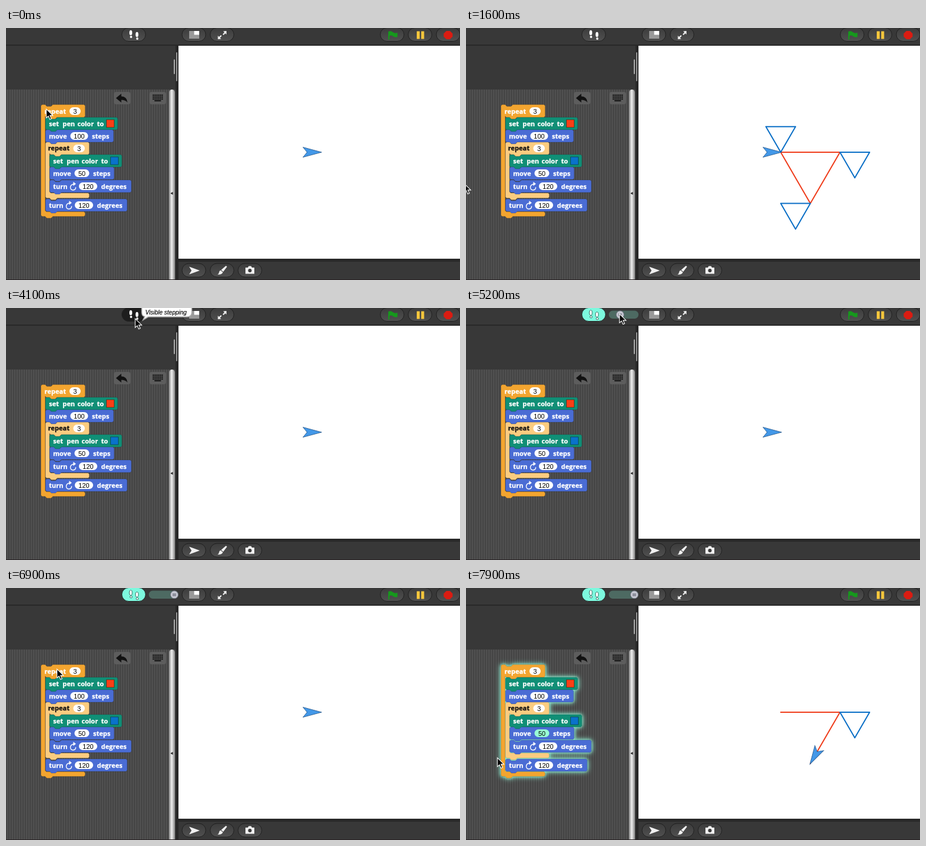
Animation of 766 by 426 pixels, one loop 8 s. Source, as an HTML page:

```html
<!DOCTYPE html>
<html lang="en">
<head>
<meta charset="utf-8">
<title>Visible stepping</title>
<style>
  html, body { margin: 0; width: 100%; height: 100%; overflow: hidden; background: #383838; }
  svg { display: block; width: 766px; height: 426px; }
  .word { font: bold 11px "Open Sans", "Noto Sans", sans-serif; fill: #fff; stroke: #fff; stroke-width: .3; }
  .dark { fill: #111; stroke: #111; }
  .num { font: 11px "Liberation Sans", Arial, sans-serif; text-anchor: middle; fill: #000; }
  .tip { font: italic 10px "Liberation Sans", Arial, sans-serif; fill: #000; stroke: #000; stroke-width: .15; }
  .block { stroke: #0004; stroke-width: .6; }
  .trail { fill: none; stroke-width: 2; stroke-linecap: round; }
  .glow { filter: drop-shadow(0 0 2px #8fecd0) drop-shadow(0 0 4px #8fecd0); }
  .lit { fill: #99ffd5; }
</style>
</head>
<body>
<svg id="stage" viewBox="0 0 766 426" xmlns="http://www.w3.org/2000/svg"></svg>
<script>
const ORANGE = '#f3a530', PALE = '#fbcc80', GREEN = '#108f76', BLUE = '#4a6cd4';
const PENS = { red: '#ef3d1c', blue: '#0b6fc6' };
const rect = (x, y, w, h, fill, rx = 0, more = '') =>
  `<rect x="${x}" y="${y}" width="${w}" height="${h}" rx="${rx}" fill="${fill}" ${more}/>`;
const shape = (d, fill, more = '') => `<path d="${d}" fill="${fill}" ${more}/>`;
const pill = (cx, cy, id = '') =>
  rect(cx - 20, cy - 12, 40, 23, 'url(#button)', 11.5, `stroke="#202020" ${id && `id="${id}"`}`);

// Block outlines: a dent on top, a matching tab underneath
const dent = (x, y, w) => `M${x} ${y + 2}l2-2h5l3 3h7l3-3H${x + w - 2}l2 2`;
const tab = x => `H${x + 20}l-3 3h-7l-3-3H${x + 2}l-2-2`;
const block = (id, d, color) => shape(d + 'z', color, `class="block" id="${id}"`);
const command = (id, x, y, w, h, color) =>
  block(id, `${dent(x, y, w)}V${y + h - 2}l-2 2${tab(x)}`, color);
const loop = (id, x, y, w, head, foot, end, color) =>
  block(id, `${dent(x, y, w)}V${y + head - 2}l-2 2${tab(x + 7)}V${foot - 2}l2 2H${x + w - 2}l2 2V${end - 2}l-2 2${tab(x)}`, color);

const word = (x, y, s, cls = '') => `<text class="word ${cls}" x="${x}" y="${y}">${s}</text>`;
const slot = (id, x, y, w, n) =>
  rect(x, y - 6.5, w, 13, '#fff', 6.5, `id="${id}Slot"`) +
  `<text class="num" x="${x + w / 2}" y="${y + 4}">${n}</text>`;

const pen = (id, x, y, color) => command(id, x, y, 122, 21, GREEN) +
  ['set', 'pen', 'color', 'to'].map((s, i) => word(x + [6, 29, 54, 87][i], y + 14.5, s)).join('') +
  rect(x + 103, y + 4, 13, 13, color, 0, `stroke="#0006" id="${id}Slot"`);
const move = (id, x, y, w, n, slotW) => command(id, x, y, w, 21, BLUE) +
  word(x + 6, y + 14.5, 'move') + slot(id, x + 42, y + 10.5, slotW, n) +
  word(x + 48.5 + slotW, y + 14.5, 'steps');
const turn = (id, x, y) => command(id, x, y, 138, 21, BLUE) + word(x + 6, y + 14.5, 'turn') +
  `<g transform="translate(${x + 39.5} ${y + 11})">` +
  shape('M1-4C-6-3-6 6 0 6 4 6 5 3 4.500 1', 'none', 'stroke="#fff" stroke-width="1.4"') +
  shape('M.5-8L5-4.500.5-1z', '#fff') + '</g>' +
  slot(id, x + 49.5, y + 10.5, 31, 120) + word(x + 87, y + 14.5, 'degrees');

const script = loop('outer', 59, 129.5, 74.5, 21.5, 310.5, 318.5, ORANGE) +
  word(65, 144.5, 'repeat') + slot('outer', 107, 140.5, 19, 3) +
  pen('penA', 66.5, 151, '#f93f16') + move('moveA', 66.5, 172, 115, 100, 30) +
  loop('inner', 66.5, 193, 74, 21, 279, 287.5, PALE) +
  word(71, 206.5, 'repeat', 'dark') + slot('inner', 113.5, 203.5, 19.5, 3) +
  pen('penB', 73.5, 214, '#0a72cb') + move('moveB', 73.5, 235, 109, 50, 25) +
  turn('turnB', 73.5, 257) + turn('turnA', 66.5, 289);

const foot = (x, y) => `<ellipse cx="${x}" cy="${y}" rx="2.4" ry="4.3"/><circle cx="${x + .5}" cy="${y + 7}" r="1.9"/>`;
const white = d => shape(d, '#f2f2f2');

const toolbar = pill(215.5, 11.5, 'feet') +
  `<g id="prints" fill="#fff">${foot(210.5, 8)}${foot(221, 11)}</g>` +
  pill(317, 11.5) + rect(309, 5, 17, 13, '#999') + rect(317.5, 5, 8.5, 6.5, '#fff') +
  pill(364.5, 11.5) + white('M372 5v6l-2-2-3 3-1.5-1.5 3-3-2-2zM357.500 19v-6l2 2 3-3 1.500 1.500-3 3 2 2z') +
  pill(651.5, 11.5) + shape('M645 6q4-2 7.500 1t8 1v7q-4 1.500-7.500-1t-6-.5v6h-2z', '#16981c') +
  pill(698.5, 11.5) + rect(693, 5.5, 5, 13, '#f5c63c') + rect(700.5, 5.5, 5, 13, '#f5c63c') +
  pill(746, 11.5) + shape('M743 5h6l4.500 4.500v5l-4.500 4.500h-6l-4.500-4.500v-5z', '#d91c12');

const corral = pill(317, 410) + white('M309 403.500L327 410l-18 6.500 4-6.500z') +
  pill(364.5, 410) + white('M371 402l2 1.500-6.500 8.500-3.500-3zM362 409.500l4 3.500q-2 4.500-9 3.500 2.500-1 2.500-3.500t2.500-3.500z') +
  pill(411.5, 410) + white('M404 405h4l1.500-2.500h4l1.500 2.500h4v10.500h-15z') +
  '<circle cx="411.500" cy="410" r="3" fill="#3c3c3c"/>';

const keys = [0, 1, 2].map(r => [0, 1, 2, 3, 4, 5].map(c =>
  rect(247.5 + c * 3, 112.5 + r * 3.2, 2.2, 2.2, '#111')).join('')).join('');

stage.innerHTML = `
<defs>
  <linearGradient id="button" x2="0" y2="1"><stop stop-color="#3c3c3c"/><stop offset="1" stop-color="#505050"/></linearGradient>
  <linearGradient id="bar"><stop stop-color="#888"/><stop offset=".45" stop-color="#eee"/><stop offset="1" stop-color="#888"/></linearGradient>
  <pattern id="stripes" width="4" height="4" patternUnits="userSpaceOnUse">
    ${rect(0, 0, 4, 4, '#505050')}${rect(0, 0, 1.5, 4, '#414141')}</pattern>
  <clipPath id="canvas">${rect(291, 30, 475, 360, '#fff')}</clipPath>
</defs>
${rect(0, 0, 766, 426, '#383838')}
${rect(0, 28, 766, 2, '#282828')}${rect(286, 30, 5, 396, '#282828')}
${rect(0, 104, 286, 322, 'url(#stripes)')}
${rect(275, 104, 10, 330, 'url(#bar)', 5)}
${shape('M277.500 279.500l4-2.500v5z', '#222')}
${rect(283, 53, 2, 25, '#aaa', 1)}${rect(287, 41, 2, 49, '#999', 1)}
${rect(182, 108, 28, 21, '#5d5d5d', 4)}
${shape('M185.500 118.500l9-7.500v4.500q9.500 0 10.500 10.500-3.500-4.500-10.500-4.500v4.500z', '#111')}
${rect(242, 108, 28, 21, '#5d5d5d', 4)}${keys}${rect(250.5, 122, 11, 2, '#111')}
${rect(291, 30, 475, 360, '#fff')}${rect(291, 390, 475, 5, '#282828')}
${rect(0, 425, 766, 1, '#262022')}<ellipse cx="377" cy="428" rx="20" ry="4" fill="#222"/>
${toolbar}${corral}
<g id="slider">${rect(241, 4.5, 50, 13.5, '#4d6a62', 6.5)}
  <g id="thumb"><circle r="6.500" fill="#c3c6d0" stroke="#667" stroke-width=".8"/>
  <path d="M-3-1h6M-3 1.500h6" stroke="#445" /></g></g>
<g id="script">${script}</g>
<g clip-path="url(#canvas)">
  <path id="red" class="trail" stroke="${PENS.red}"/><path id="blue" class="trail" stroke="${PENS.blue}"/>
  ${shape('M1.500 0L-30-8.500-23 0-30 8.500z', '#4398e8', 'id="arrow" stroke="#2c5f95" stroke-width=".9"')}
</g>
<g id="bubble">${shape('M234-6H308q5.500 0 5.500 6v7q0 8-8 8H240l-9 5.500 3-6q-5-1-5-7V0q0-6 5-6z', '#fff', 'stroke="#aaa" stroke-width="1.500"')}
  <text class="tip" x="235" y="11">Visible stepping</text></g>
${shape('M0 0v15l3.500-3.200 2.500 5.700 2.600-1.100-2.500-5.500h4.900z', '#000', 'id="cursor" stroke="#fff" stroke-width="1.100"')}`;

const el = id => document.getElementById(id);

// Each command lights its input first, then runs
const two = id => [id + 'Slot', id];
const times = (n, list) => Array(n).fill(list).flat();
const inner = ['innerSlot', ...times(3, ['penB', 'moveB', 'turnB'].flatMap(two))];
const program = ['outerSlot',
  ...times(3, [...two('penA'), ...two('moveA'), ...inner, ...two('turnA')])];

function trace(count) {
  let x = 531, y = 210, angle = 0, color = 'red';
  const lines = { red: '', blue: '' };
  for (const step of program.slice(0, count)) {
    if (step === 'penA') color = 'red';
    if (step === 'penB') color = 'blue';
    if (step === 'turnA' || step === 'turnB') angle = (angle + 120) % 360;
    if (step === 'moveA' || step === 'moveB') {
      const far = step === 'moveA' ? 100 : 50, a = angle * Math.PI / 180;
      lines[color] += `M${x} ${y}`;
      x += far * Math.cos(a);
      y += far * Math.sin(a);
      lines[color] += `L${x} ${y}`;
    }
  }
  el('red').setAttribute('d', lines.red);
  el('blue').setAttribute('d', lines.blue);
  el('arrow').setAttribute('transform', `translate(${x} ${y}) rotate(${angle})`);
}

const path = [[0, 68, 137], [900, 68, 137], [1600, -3, 263], [1800, -30, 320], [2300, -30, 345],
  [2400, 2, 341], [2700, 130, 170], [3200, 400, 8], [3600, 218, 18], [4650, 218, 18],
  [5100, 259, 10], [5300, 259, 10], [5800, 284, 10], [6200, 284, 10], [6850, 86, 137],
  [7350, 86, 137], [7900, 53, 287]];

function pointer(t) {
  const i = path.findIndex(p => p[0] > t);
  if (i < 0) return path.at(-1).slice(1);
  const [t0, x0, y0] = path[i - 1], [t1, x1, y1] = path[i];
  const k = (t - t0) / (t1 - t0), e = k * k * (3 - 2 * k);
  return [x0 + (x1 - x0) * e, y0 + (y1 - y0) * e];
}

const show = (id, on) => el(id).style.display = on ? '' : 'none';
const FAST = 850, CLEAR = 2200, TOGGLE = 4650, SLOW = 7335, TICK = 17;
let lit;

function draw(t) {
  const stepping = t >= SLOW, drawn = t >= FAST && t < CLEAR;
  const fast = drawn ? Math.floor((t - FAST) / TICK) * 6 : 0;
  const slow = stepping ? Math.floor((t - SLOW) / TICK) : 0;
  trace(stepping ? slow : fast);
  const running = stepping || (drawn && fast < program.length);
  el('script').setAttribute('class', running ? 'glow' : '');

  if (lit) lit.classList.remove('lit');
  lit = stepping ? el(program[slow]) : null;
  if (lit) lit.classList.add('lit');

  const [x, y] = pointer(t);
  el('cursor').setAttribute('transform', `translate(${x} ${y})`);
  const on = t >= TOGGLE;
  el('feet').setAttribute('fill', on ? '#7df8de' : t >= 3600 ? '#1e1e1e' : 'url(#button)');
  el('prints').setAttribute('stroke', on ? '#356e64' : 'none');
  show('slider', on);
  show('bubble', t >= 4000 && !on);
  const thumbX = t < 5300 ? 260 : t < 5800 ? x + 1 : 284;
  el('thumb').setAttribute('transform', `translate(${Math.min(thumbX, 284)} 11.3)`);
}

function frame() {
  draw(Math.floor(performance.now() % 8000 / 100) * 100);
  requestAnimationFrame(frame);
}
frame();
</script>
</body>
</html>
```
